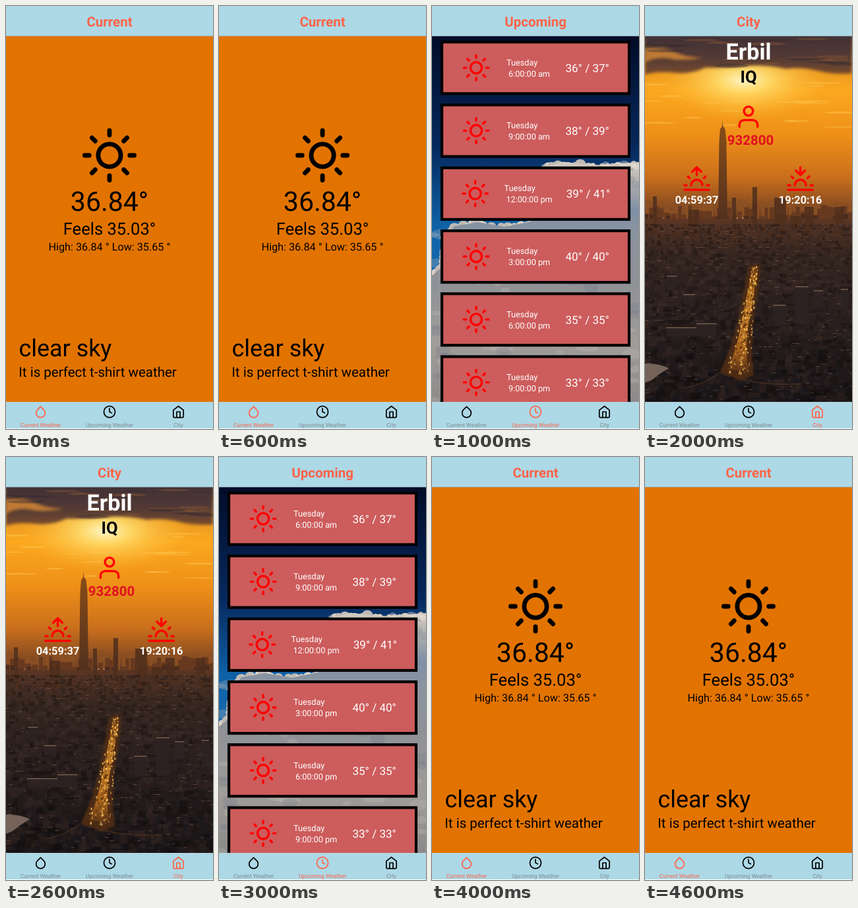
Write an HTML page that moves like this. It is 314x640 px and loops after 5 s.

```html
<!DOCTYPE html>
<html lang="en">
<head>
<meta charset="utf-8">
<title>Weather</title>
<style>
  html, body { margin: 0; width: 100%; height: 100%; overflow: hidden; background: #fff; }
  svg { display: block; width: 100vw; height: 100vh; }
  text { font-family: Roboto, "Liberation Sans", sans-serif; white-space: pre; text-rendering: geometricPrecision; }
  .icon { fill: none; stroke-width: 2; stroke-linecap: round; stroke-linejoin: round; }
</style>
</head>
<body>
<svg id="stage" viewBox="0 0 314 640" xmlns="http://www.w3.org/2000/svg"></svg>
<script>
const ACCENT = '#ff6347', BAR = '#add8e6';

// Icons on a 24-unit grid
const ICONS = {
  sun: 'M17 12a5 5 0 1 1-10 0a5 5 0 1 1 10 0zM12 1v2M12 21v2M4.22 4.22l1.42 1.42M18.36 18.36l1.42 1.42M1 12h2M21 12h2M4.22 19.78l1.42-1.42M18.36 5.64l1.42-1.42',
  drop: 'M12 2.69l5.66 5.66a8 8 0 1 1-11.31 0z',
  clock: 'M22 12a10 10 0 1 1-20 0a10 10 0 1 1 20 0zM12 6v6l4 2',
  home: 'M3 9l9-7 9 7v11a2 2 0 0 1-2 2H5a2 2 0 0 1-2-2zM9 22V12h6v10',
  user: 'M20 21v-2a4 4 0 0 0-4-4H8a4 4 0 0 0-4 4v2M16 7a4 4 0 1 1-8 0a4 4 0 1 1 8 0z',
  rise: 'M8 6l4-4 4 4M12 2v7',
  set: 'M16 5l-4 4-4-4M12 9V2',
  horizon: 'M17 18a5 5 0 0 0-10 0M4.22 10.22l1.42 1.42M1 18h2M21 18h2M18.36 11.64l1.42-1.42M23 22H1'
};

let seed = 7;
const rnd = (a = 0, b = 1) => {
  seed = (seed * 16807) % 2147483647;
  return a + (b - a) * seed / 2147483647;
};
const n = v => v.toFixed(1);

const rect = (x, y, w, h, fill, more = '') =>
  `<rect x="${n(x)}" y="${n(y)}" width="${n(w)}" height="${n(h)}" fill="${fill}" ${more}/>`;
const blob = (x, y, rx, ry, fill, alpha = 1) =>
  `<ellipse cx="${n(x)}" cy="${n(y)}" rx="${n(rx)}" ry="${n(ry)}" fill="${fill}" opacity="${alpha}"/>`;
const path = (d, fill, more = '') => `<path d="${d}" fill="${fill}" ${more}/>`;
const icon = (name, x, y, size, color) =>
  `<path class="icon" stroke="${color}" transform="translate(${x - size / 2} ${y - size / 2}) scale(${size / 24})" d="${ICONS[name]}"/>`;
const text = (s, x, y, size, fill, anchor = 'middle', weight = 400) =>
  `<text x="${x}" y="${y}" font-size="${size}" fill="${fill}" text-anchor="${anchor}" font-weight="${weight}">${s}</text>`;
const bold = (s, x, y, size, fill) => text(s, x, y, size, fill, 'middle', 700);

const gradient = (id, stops) =>
  `<linearGradient id="${id}" x2="0" y2="1">${stops.map(([o, c]) =>
    `<stop offset="${o}" stop-color="${c}"/>`).join('')}</linearGradient>`;

const defs = `<defs>
  ${gradient('night', [[0, '#020c28'], [.3, '#06285c'], [.52, '#0f62a8'], [1, '#2a7ab8']])}
  ${gradient('cloud', [[0, '#d6cdc2'], [.08, '#b3b1b0'], [.2, '#7f90a6'], [.3, '#8b949f'], [.5, '#8f9196'], [.75, '#a09d9a'], [1, '#8c8a8a']])}
  ${gradient('dusk', [[0, '#6b4a34'], [.12, '#e08f22'], [.3, '#fba81f'], [.55, '#ee8f18'], [.78, '#c96f1c'], [1, '#6e3f24']])}
  ${gradient('pall', [[0, '#3e2f35'], [.6, '#533a34'], [1, '#7a4c2c']])}
  ${gradient('ground', [[0, '#5c3623'], [.2, '#35251f'], [.5, '#2a201f'], [1, '#17151a']])}
  ${gradient('tower', [[0, '#8a4e18'], [1, '#52301e']])}
  ${gradient('road', [[0, '#b0661c'], [.4, '#e8962a'], [.8, '#cc781e'], [1, '#6a3c18']])}
  <radialGradient id="glow"><stop offset="0" stop-color="#fff6c8"/><stop offset=".3" stop-color="#ffdf70" stop-opacity=".85"/><stop offset="1" stop-color="#ffb62c" stop-opacity="0"/></radialGradient>
  <filter id="soft" x="-20%" y="-50%" width="140%" height="200%"><feGaussianBlur stdDeviation="2"/></filter>
</defs>`;

function cloudySky() {
  const edge = [[0, 408], [14, 396], [20, 350], [34, 333], [70, 327], [110, 334], [150, 326], [163, 244], [200, 236], [250, 241], [314, 236]];
  let s = rect(0, 45, 314, 555, 'url(#night)'), puffs = '';
  for (let i = 1; i < edge.length; i++) {
    const [x0, y0] = edge[i - 1], [x1, y1] = edge[i];
    for (let k = 0; k < 8; k++) {
      const t = k / 8, r = rnd(3, 7);
      puffs += blob(x0 + (x1 - x0) * t, y0 + (y1 - y0) * t + rnd(0, 5), r * 1.2, r, rnd() < .5 ? '#ddd3c6' : '#bfbab5');
    }
  }
  s += puffs + path(`M${edge.join('L')}V600H0z`, 'url(#cloud)');
  for (let i = 0; i < 110; i++)
    s += blob(rnd(0, 314), rnd(345, 600), rnd(5, 20), rnd(3, 9), rnd() < .5 ? '#c9c4bc' : '#6b7382', .25);
  for (let i = 0; i < 30; i++)
    s += blob(rnd(165, 314), rnd(238, 275), rnd(3, 9), rnd(2, 6), rnd() < .5 ? '#eee6da' : '#8d939c', .4);
  return s;
}

function cityDusk() {
  let s = rect(0, 45, 314, 275, 'url(#dusk)');
  s += blob(150, 112, 130, 62, 'url(#glow)');

  // Dark cloud bank with a ragged, lit lower edge
  s += path('M0 40H314V102Q286 104 262 98T214 95Q180 88 150 91T92 93Q70 104 44 101T0 104z', 'url(#pall)', 'filter="url(#soft)"');
  s += path('M0 64Q28 62 46 70T88 78Q60 84 38 80T0 86z', '#d98a35', 'opacity=".8" filter="url(#soft)"');
  for (let i = 0; i < 26; i++)
    s += blob(rnd(0, 314), rnd(50, 92), rnd(8, 30), rnd(1, 3), rnd() < .5 ? '#8a5832' : '#33282e', .4);
  for (let i = 0; i < 20; i++)
    s += blob(rnd(0, 314), rnd(104, 185), rnd(8, 30), rnd(.6, 2), '#ffd060', .35);

  // Skyline, far to near
  for (const [base, low, high, color] of [[318, 8, 26, '#8a4f22'], [326, 8, 26, '#67391f'], [336, 6, 22, '#4a2b1d']])
    for (let x = -4; x < 314; x += rnd(5, 11)) {
      const h = rnd(low, high);
      s += rect(x, base - h, rnd(5, 10), h + 6, color);
    }
  s += rect(0, 322, 314, 278, 'url(#ground)');
  s += path('M111 322L112.5 205L114 186L117 182L117.5 173L118.5 182L121.5 186L123.5 205L125 322z', 'url(#tower)');
  for (const [x, y, w] of [[163, 274, 7], [196, 290, 18], [221, 318, 17], [242, 304, 14], [66, 308, 16], [132, 290, 6], [288, 304, 14], [12, 288, 6]])
    s += rect(x, y, w, 350 - y, '#4f2e1d', 'opacity=".85"');

  // Rooftops grow with nearness
  for (let y = 330; y < 600; y += 5) {
    const near = (y - 330) / 270;
    for (let x = -6; x < 314; x += rnd(5, 10 + near * 14)) {
      const v = rnd(24, 60) - near * 14;
      s += rect(x, y, rnd(3, 8 + near * 10), rnd(2, 6 + near * 7), `rgb(${v * 1.2 | 0},${v * .88 | 0},${v * .8 | 0})`, 'opacity=".55"');
      if (rnd() < .12) s += rect(x, y, rnd(2, 7), 1, '#7a5d4c', 'opacity=".6"');
    }
  }
  for (const [x, y, w, h] of [[33, 408, 15, 22], [58, 436, 18, 16], [32, 486, 46, 14], [194, 452, 20, 30], [228, 424, 20, 58], [256, 430, 14, 26], [297, 428, 11, 40], [78, 480, 30, 20]])
    s += rect(x, y, w, h, '#2e2423', 'opacity=".8"') + rect(x, y, w, 1.4, '#77604f');
  s += path('M0 541Q20 540 36 548Q22 556 10 566L0 570z', '#75635a');

  const road = 'M159 392H174Q172 430 164 470Q158 510 164 558L146 566L114 554Q136 510 143 470Q151 430 159 392z';
  s += path(road, '#a85c18', 'opacity=".4" filter="url(#soft)"') + path(road, '#4a2a15', 'opacity=".8"');
  s += path('M163 394H171Q167 430 159 470Q150 515 157 552L126 550Q142 510 148 470Q156 430 163 394z', 'url(#road)', 'opacity=".7"');
  for (let i = 0; i < 260; i++) {
    const t = rnd(), x = 167 - 26 * t + rnd(-1, 1) * (4 + t * 14);
    s += blob(x, 394 + t * 162, rnd(.5, 1.5), rnd(.6, 2.2), rnd() < .5 ? '#ffc860' : '#4a2813', .8);
  }
  s += path('M112 556Q90 572 60 578M150 566Q190 574 236 572', 'none', 'stroke="#7a4a20" stroke-width="1.5" opacity=".4"');
  return s;
}

const current = () => rect(0, 45, 314, 555, '#e27300')
  + icon('sun', 157, 226, 82, '#000')
  + text('36.84°', 157, 309.5, 41, '#000')
  + text('Feels 35.03°', 157, 346, 25.6, '#000')
  + text('High: 36.84 ° Low: 35.65 °', 157, 370, 16.2, '#000')
  + text('clear sky', 19.5, 530, 35.9, '#000', 'start')
  + text('It is perfect t-shirt weather', 19.3, 560.5, 20.5, '#000', 'start');

function upcoming() {
  const rows = [['6:00:00 am', 36, 37], ['9:00:00 am', 38, 39], ['12:00:00 pm', 39, 41],
    ['3:00:00 pm', 40, 40], ['6:00:00 pm', 35, 35], ['9:00:00 pm', 33, 33]];
  return cloudySky() + rows.map(([time, low, high], i) => {
    const y = 52.4 + i * 95.2, wide = time.length > 10;
    return rect(15, y + 2.1, 284, 78, '#cd5c5c', 'stroke="#000" stroke-width="4.2"')
      + icon('sun', wide ? 65.6 : 67, y + 41, 41, '#f00')
      + text('Tuesday', wide ? 109.6 : 113, y + 37.4, 12.7, '#fff', 'start')
      + text(time, wide ? 112.4 : 116, y + 54.4, 12.7, '#fff', 'start')
      + text(`${low}° / ${high}°`, wide ? 237 : 235.7, y + 47.4, 17, '#fff');
  }).join('');
}

const city = () => cityDusk()
  + bold('Erbil', 157, 81, 34.2, '#fff')
  + bold('IQ', 157, 116, 25.6, '#000')
  + icon('user', 157, 167.5, 41, '#f00')
  + bold('932800', 160, 210.3, 20.5, '#e01020')
  + icon('horizon', 78.5, 261, 41, '#f00') + icon('rise', 78.5, 261, 41, '#f00')
  + icon('horizon', 235.7, 261, 41, '#f00') + icon('set', 235.7, 261, 41, '#f00')
  + bold('04:59:37', 78.5, 299, 16.4, '#fff')
  + bold('19:20:16', 235.7, 299, 16.4, '#fff');

const TABS = [['drop', 'Current Weather', 52.5], ['clock', 'Upcoming Weather', 157], ['home', 'City', 261.5]];
const SCREENS = [['Current', current], ['Upcoming', upcoming], ['City', city]];

const frame = (title, active) => rect(0, 0, 314, 45.5, BAR) + rect(0, 45, 314, .6, '#8fa9b2')
  + bold(title, 157, 31, 20.5, ACCENT)
  + rect(0, 599, 314, 40, BAR) + rect(0, 599, 314, .5, '#c4d4d9') + rect(0, 639, 314, 1, '#fff')
  + TABS.map(([name, label, x], i) =>
    icon(name, x, 614, 20.5, i === active ? ACCENT : '#000')
    + text(label, x, 637, 8.5, i === active ? ACCENT : '#7c8a90')).join('');

const stage = document.getElementById('stage');
stage.innerHTML = defs + SCREENS.map(([title, draw], i) =>
  `<g class="screen">${draw()}${frame(title, i)}</g>`).join('');

const screens = stage.querySelectorAll('.screen');
const ORDER = [0, 1, 2, 1, 0], STEP = 1000;
const start = performance.now();

function show() {
  const time = Math.max(0, performance.now() - start);
  const now = ORDER[Math.floor(time / STEP) % ORDER.length];
  screens.forEach((g, i) => { g.style.display = i === now ? '' : 'none'; });
  requestAnimationFrame(show);
}
show();
</script>
</body>
</html>
```
